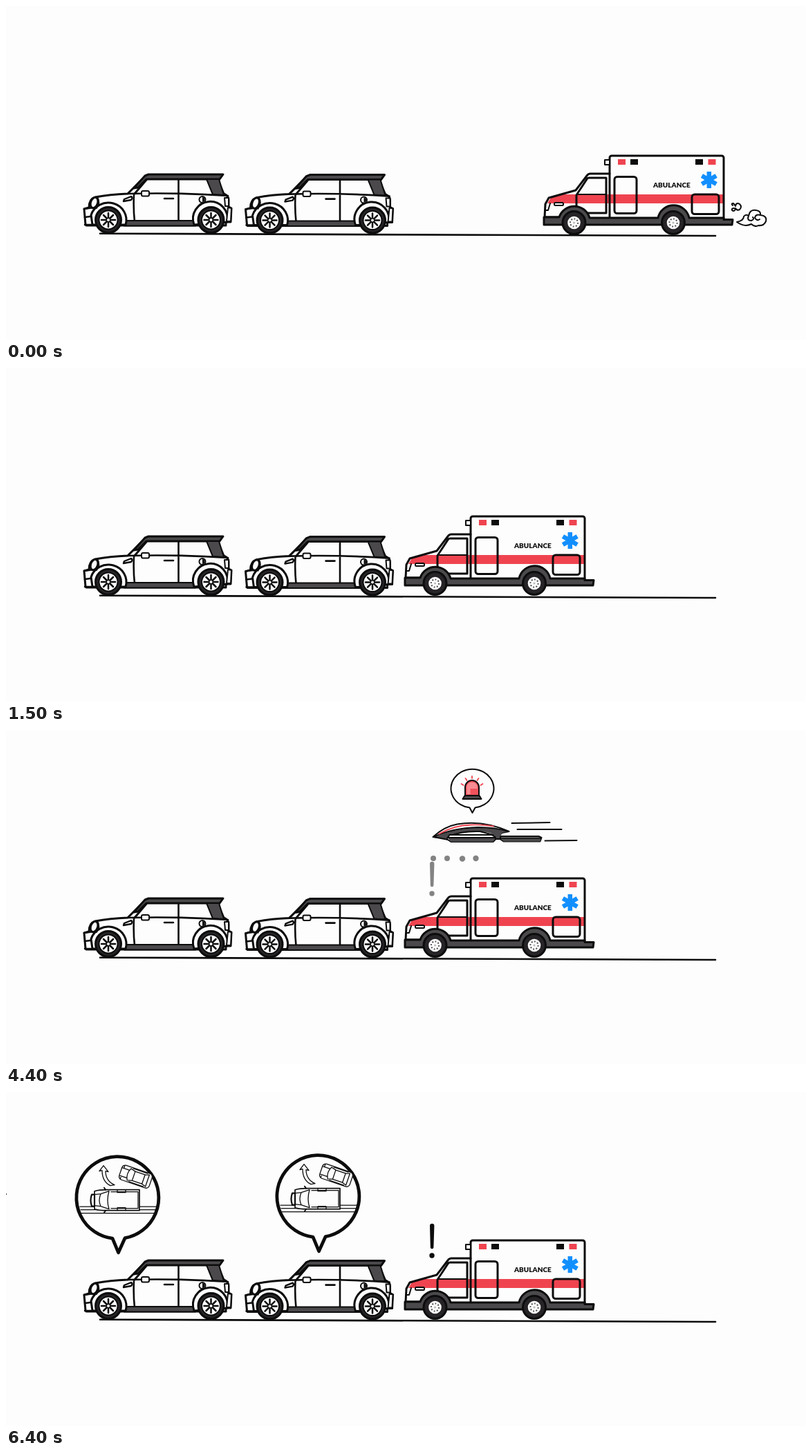
An HTML page for the animation above (7300 ms loop, 1157 by 484 pixels).

```html
<!DOCTYPE html>
<html lang="en">
<head>
<meta charset="utf-8">
<title>Ambulance and drone</title>
<style>
  html, body { margin: 0; width: 100%; height: 100%; overflow: hidden; background: #fdfdfd; }
  svg { display: block; width: 1157px; height: 484px; }
  .ink { fill: none; stroke: #0c0c0d; stroke-width: 3; stroke-linecap: round; stroke-linejoin: round; }
  .white { fill: #fdfdfd; }
  .gray { fill: #4b494b; }
  .tire { fill: #272427; }
  .black { fill: #0c0c0d; }
  .red { fill: #ef4450; }
  .thin { stroke-width: 2; }
  .hair { stroke-width: 1.3; }
  .ray { fill: none; stroke: #ef4450; stroke-width: 1.8; stroke-linecap: round; }
  text { font: 900 10px Lato, "Open Sans", sans-serif; fill: #0c0c0d; }
</style>
</head>
<body>
<svg viewBox="0 0 1157 484">
  <defs>
    <g id="carWheel">
      <circle class="ink tire" r="18.5"/>
      <circle class="ink white thin" r="13.5"/>
      <path class="ink" style="stroke-width:2.5" d="M0-10V10M-10 0H10M-7-7 7 7M-7 7 7-7"/>
      <circle class="white" r="2"/>
    </g>

    <g id="vanWheel">
      <circle class="ink tire" r="16.5"/>
      <circle class="white" r="9.3"/>
      <circle r="5.6" fill="none" stroke="#4b494b" stroke-width="2" pathLength="8" stroke-dasharray=".42 .58"/>
      <circle r="1.6" fill="#bbb"/>
    </g>

    <g id="car">
      <path class="ink white" d="M115 317 113 294 120 292Q120 280 129 277Q150 273 176 272L202 246H312L306 251 315 272Q322 275 322 281V291L326 293 325 313H318L318 318H116Z"/>
      <path class="ink gray" d="M201 246 206 244H314L309 251H203L191 263 185 264Z"/>
      <path class="white" d="M186 271 203 253H248V271Z"/>
      <path class="ink" d="M186 272 203 252"/>
      <path class="ink gray" style="stroke-width:2" d="M290 251H308L315 274 299 273Z"/>
      <path class="ink" style="stroke-width:2.6" d="M176 272Q250 270 321 275M185 273Q184 294 186 312M249.5 252V312V318M229 279H242"/>
      <path class="ink gray thin" d="M171 311H274V318.5H171Z"/>
      <path class="ink white" d="M123 303A26 25 0 0 1 173 317H125Z"/>
      <path class="ink white" d="M272 317A25 25 0 1 1 320 313Z"/>
      <path class="ink white thin" d="M316 278H322V290H317ZM321 292 326 293 325 312H319Z"/>
      <path class="ink" style="stroke-width:2.5" d="M113 294 127 292M114 306 122 305M114 317H126"/>
      <ellipse class="ink white" style="stroke-width:3" rx="5" ry="8" transform="translate(127.500 285) rotate(20)"/>
      <path class="ink thin" d="M132 277Q137 284 131 293"/>
      <path class="ink white" style="stroke-width:2.4" d="M171 280 181 276Q184 278 181 281L170 283Z"/>
      <rect class="ink white thin" x="196" y="268" width="11" height="7.5" rx="2"/>
      <circle class="ink white thin" cx="284" cy="280.5" r="4.5"/>
      <path class="black" d="M284 277a3.5 3.5 0 0 1 0 7z"/>
      <use href="#carWheel" x="148" y="310"/>
      <use href="#carWheel" x="296.5" y="310"/>
    </g>

    <g id="van">
      <path class="white" d="M779 306V287L783 277 824 267 843 243H873V217H1038V310H779Z"/>
      <path class="red" d="M789 276 800 273H1037V286H783Z"/>
      <rect class="ink" x="873" y="217" width="165" height="98" rx="3"/>
      <rect class="ink white thin" x="866" y="223" width="7" height="7"/>
      <path class="ink" d="M873 243H845Q842 243 840 246L824 267 785 278 780 287 779 306H810M843 249H868V300H839L825 290V274L840 251Q841 249 843 249Z"/>
      <path class="white" d="M828 272 843 251H866V272Z"/>
      <path class="ink thin" d="M826 273H867M781 296H784L787 286"/>
      <rect class="ink white thin" x="793" y="285" width="13" height="4" rx="1.5"/>
      <path class="ink gray" d="M778 306H800A23 23 0 0 1 844 307H943A23 23 0 0 1 988 307H1038V309.5H1051L1050 317H778Z"/>
      <rect class="ink" x="880" y="247.5" width="32" height="53" rx="4"/>
      <rect class="ink" x="992" y="273" width="39" height="28.5" rx="4"/>
      <path class="red" d="M885 222h11v8h-11zM1015.500 222h11v8h-11z"/>
      <path class="black" d="M903 222h11v8h-11zM997 222h11v8h-11z"/>
      <text x="936" y="262.5">ABULANCE</text>
      <g stroke="#128fff" stroke-width="6.5" transform="translate(1016.800 252)">
        <path d="M0-12V12M-10.400-6 10.400 6M-10.400 6 10.400-6"/>
      </g>
      <use href="#vanWheel" x="821.500" y="314"/>
      <use href="#vanWheel" x="965" y="314"/>
    </g>

    <g id="beacon">
      <path class="ink white thin" d="M993 114.500A31 28 0 1 1 1001 114.500L997 122Z"/>
      <path class="ink thin" d="M986.500 97V85a10 10 0 0 1 20 0V97Z" style="fill:#f0525c"/>
      <path d="M989 95V84a6 6 0 0 1 6-6H998a6 6 0 0 1 6 6V87H994V95Z" fill="#f78d93"/>
      <path class="ink gray thin" d="M986 97H1007L1010 102H983Z"/>
      <path class="ray" d="M996.500 69V72M987 72 989 75M1006 72 1004 75M981 80 984 82M1012 80 1009 82"/>
    </g>

    <g id="aircraft">
      <path class="ink white thin" d="M940 157Q956 142 975 138.500Q1012 132 1050 149L1040 151 1032 158H950Z"/>
      <path class="gray" d="M943 157Q970 145 1005 143Q1030 143 1049 149L1040 151 1036 160H1030L1027 153Q1020 149 1000 149Q980 149 964 156L958 160Z"/>
      <path class="ink thin" d="M941 157Q968 144 1005 143Q1030 143 1049 149M941 157 962 161M963 156Q982 148 1008 149L1027 154"/>
      <path d="M948 153Q970 140 995 139.500Q1012 139 1028 141.500" fill="none" stroke="#ef4450" stroke-width="1.8"/>
      <path class="ink white thin" d="M964 154H1025L1030 157V161L1027 164H966L960 160ZM1038 156H1093L1097 158 1095 163.500H1042L1037 160Z"/>
      <path class="gray" d="M961 158H1030L1027 164H966ZM1038 158.500H1096L1095 163.500H1042Z"/>
      <path class="ink thin" d="M961 158H1030M1038 158.500H1096M1030 160H1038"/>
      <path class="ink thin" d="M1054 137 1109 136M1062 146H1126M1102 162.500 1148 162"/>
    </g>

    <g id="plan">
      <path class="ink white" style="stroke-width:4.800" d="M443 209.500A59.500 59.500 0 1 1 461 209L451.500 230Z"/>
      <path class="ink hair" d="M396 163.500H509M397 168H508M398 173H507"/>
      <g class="ink hair">
        <path class="white" d="M417 141Q424 139 434 139H482V169H434Q424 169 417 167Z" stroke-width="1.700"/>
        <path class="white" d="M417 146H413Q410 154 413 163H417Z" stroke-width="2.200"/>
        <path d="M426 145 438 141Q434 154 438 167L426 163Q422 154 426 145ZM441 142H480V166H441M417 146 426 145M417 162 426 163M450 139V143H462V139M450 169V165H462V169"/>
        <path stroke-width="2" d="M433 139 431 136M433 169 431 172"/>
        <path class="white" d="M446 132Q433 126 433 112L437 113 430 104 424 112 428 111Q428 127 440 133Z"/>
        <g transform="translate(476.500 120) rotate(19)">
          <rect class="white" x="-23" y="-11" width="46" height="22" rx="5"/>
          <path d="M-10-9Q-15 0-10 9L-3 7V-7ZM-3-7H12V7H-3M12-7 18-9V9L12 7M-22-6H-12M-22 6H-12M-7-10H15M-7 10H15M-20-10V-6M-20 10V6"/>
        </g>
      </g>
    </g>
  </defs>

  <path class="ink" style="stroke-width:2.6" d="M136 329.700 1026 333"/>
  <use href="#car"/>
  <use href="#car" x="233.500" y=".6"/>
  <g id="puff">
    <path id="smallPuff" class="ink thin" d="M1051 289Q1048 286 1052 286Q1054 288 1055 290Q1056 284 1061 287Q1065 291 1061 295Q1057 297 1055 293Q1054 299 1050 296Q1049 293 1053 293"/>
    <path id="bigPuff" class="ink thin" d="M1057 313Q1067 311 1067 305Q1070 301 1074 304Q1076 294 1085 296Q1092 297 1091 303Q1101 304 1099 312Q1096 319 1088 318Q1083 321 1078 316Q1068 321 1057 313M1074 304Q1071 311 1078 311Q1083 309 1080 306M1091 303Q1084 301 1083 307Q1086 312 1090 309"/>
  </g>
  <use id="ambulance" href="#van"/>
  <g id="dots" class="black">
    <circle cx="618" cy="186" r="4"/>
    <circle cx="638" cy="186" r="4"/>
    <circle cx="660" cy="186.500" r="4.200"/>
    <circle cx="679.500" cy="186" r="4.200"/>
  </g>
  <g id="alert">
    <path class="black" d="M613 194a3.200 3.200 0 0 1 6.400 0L618.400 225a2.300 2.300 0 0 1-4.600 0Z"/>
    <circle class="black" cx="616" cy="237" r="3.700"/>
  </g>
  <use id="planNear" href="#plan" x="1" y=".7"/>
  <use id="planFar" href="#plan" x="-289" y="2.700"/>
  <g id="drone"><use href="#aircraft"/><use href="#beacon"/></g>
</svg>
<script>
  const LOOP = 7300, STEP = 100;
  const el = id => document.getElementById(id);
  const dots = [...el('dots').children];
  const dotStarts = [1800, 2100, 2500, 2900];
  // time, x, y
  const vanPath = [[0, 0, 0], [800, -122.7, 1], [1500, -201, -2]];
  const dronePath = [[3200, 217, 0], [4000, -19, 0], [4800, -626, -4], [5600, -857, -11], [6400, -1148, -14]];

  const clamp = v => Math.min(1, Math.max(0, v));
  const progress = (t, from, to) => clamp((t - from) / (to - from));
  const fade = (t, from, to) => clamp(progress(t, from, to) * 2 - 0.5);
  const linear = p => p;
  const soften = p => p - 0.36 * Math.sin(2 * Math.PI * p) / (2 * Math.PI);

  function along(path, t, ease) {
    let i = 0;
    while (i < path.length - 2 && t >= path[i + 1][0]) i++;
    const [from, x0, y0] = path[i], [to, x1, y1] = path[i + 1];
    const p = ease(progress(t, from, to));
    return [x0 + (x1 - x0) * p, y0 + (y1 - y0) * p];
  }
  const move = (id, [x, y], extra = '') =>
    el(id).setAttribute('transform', `translate(${x} ${y}) ${extra}`);
  const show = (node, alpha) => node.style.opacity = alpha;

  function draw(t) {
    move('ambulance', along(vanPath, t, linear));
    move('drone', along(dronePath, t, soften));
    show(el('drone'), t > 3200 ? 1 : 0);

    const drive = progress(t, 0, 800);
    move('puff', along(vanPath, Math.min(t, 800), linear));
    move('smallPuff', [6 * drive, -12 * drive]);
    move('bigPuff', [-drive, -3 * drive], `translate(1057 318) scale(${1 + 0.14 * drive}) translate(-1057 -318)`);
    show(el('puff'), 1 - progress(t, 800, 1500));

    const alert = fade(t, 4000, 4800);
    dots.forEach((dot, i) => show(dot, progress(t, dotStarts[i], dotStarts[i] + 200)));
    show(el('dots'), 1 - alert);
    show(el('alert'), alert);
    show(el('planNear'), fade(t, 4800, 5600));
    show(el('planFar'), fade(t, 5600, 6400));
  }

  function tick() {
    draw(Math.floor(performance.now() % LOOP / STEP) * STEP);
    requestAnimationFrame(tick);
  }
  tick();
</script>
</body>
</html>
```
